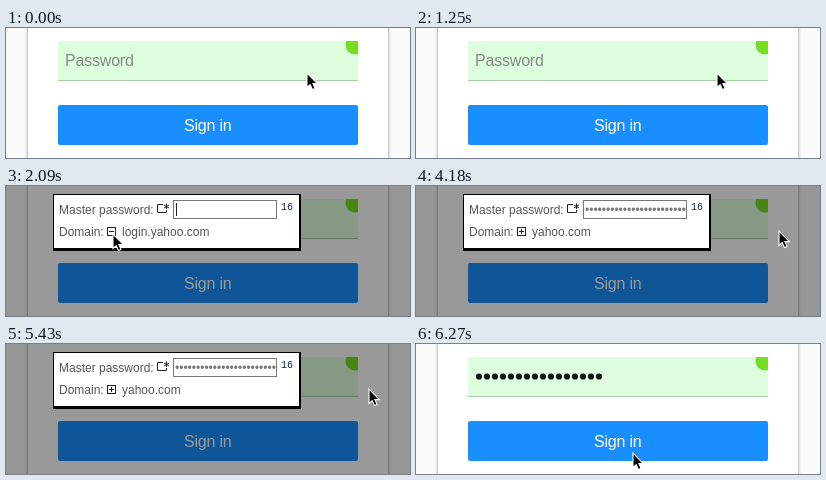
Animation, 404 px wide and 130 px high, one loop 8.36 s. Source, as an HTML page:

```html
<!DOCTYPE html>
<html lang="en">
<head>
<meta charset="utf-8">
<title>Sign in</title>
<style>
  html, body { margin: 0; width: 100%; height: 100%; overflow: hidden; background: #fafafa; }
  svg { position: absolute; left: 0; top: 0; width: 404px; height: 130px; display: block; }
  text { font-family: "Liberation Sans", Arial, sans-serif; font-size: 12px; fill: #555; white-space: pre; }
  .big { font-size: 16px; letter-spacing: -.2px; }
  .mono { font-family: "Liberation Mono", "DejaVu Sans Mono", monospace; font-size: 10px; fill: #124; }
  .line { fill: none; stroke: #222; }

  .empty, .popup, .open, .typed, .filled { animation: 8360ms step-end infinite; }
  .empty { animation-name: empty; }
  .popup { animation-name: popup; }
  .open { animation-name: open; }
  .typed { animation-name: typed; }
  .filled { animation-name: filled; }
  .cursor { animation: move 8360ms step-end infinite; }

  @keyframes empty { 0% { visibility: visible } 75%, 100% { visibility: hidden } }
  @keyframes popup { 0% { visibility: hidden } 25% { visibility: visible } 75%, 100% { visibility: hidden } }
  @keyframes open { 0% { visibility: hidden } 25% { visibility: visible } 50%, 100% { visibility: hidden } }
  @keyframes typed { 0% { visibility: hidden } 50% { visibility: visible } 75%, 100% { visibility: hidden } }
  @keyframes filled { 0% { visibility: hidden } 75%, 100% { visibility: visible } }
  @keyframes move {
    0% { transform: translate(301px, 45px) }
    25% { transform: translate(107px, 48px) }
    50% { transform: translate(363px, 45px) }
    75%, 100% { transform: translate(217px, 109px) }
  }
</style>
</head>
<body>
<svg viewBox="0 0 404 130">
  <defs>
    <clipPath id="field"><rect x="52" y="13" width="300" height="40"/></clipPath>
    <clipPath id="input"><rect x="168" y="15" width="102" height="17"/></clipPath>
    <filter id="soft" x="-10%" y="-10%" width="120%" height="120%"><feGaussianBlur stdDeviation="1.5"/></filter>
  </defs>

  <!-- form -->
  <rect x="21.5" y="-20" width="361" height="170" fill="#000" opacity=".35" filter="url(#soft)"/>
  <rect x="22" y="-20" width="360" height="170" fill="#fff"/>
  <g clip-path="url(#field)">
    <rect x="52" y="13" width="300" height="40" fill="#dfd"/>
    <rect x="52" y="52" width="300" height="1" fill="#a9cda9"/>
    <circle cx="349" cy="17" r="9.5" fill="#7d2"/>
  </g>
  <text class="big empty" x="59" y="38" style="fill:#888">Password</text>
  <path class="filled" d="M63 32.5H184" fill="none" stroke="#111" stroke-width="6.2" stroke-linecap="round" stroke-dasharray="0 8"/>
  <rect x="52" y="77" width="300" height="40" rx="2" fill="#198fff"/>
  <text class="big" x="178" y="103" style="fill:#fff">Sign in</text>

  <!-- master password popup -->
  <g class="popup">
    <rect width="404" height="130" opacity=".4"/>
    <rect x="47" y="8" width="248" height="57"/>
    <rect x="48" y="9" width="245" height="53" fill="#fff"/>
    <text x="53" y="28">Master password:</text>
    <path class="line" d="M157 18.5H151.5V26.5H160.5V24M160.5 17.5V23M158 19L163 22M158 22L163 19"/>
    <rect x="167.5" y="14.5" width="103" height="18" fill="#fff" stroke="#777"/>
    <text class="mono" x="275" y="24">16</text>
    <text x="53" y="50">Domain:</text>
    <rect class="line" x="101.5" y="41.5" width="8" height="8"/>
    <path class="line" d="M103 45.5H108"/>
  </g>
  <g class="open">
    <path d="M170.5 17V30" stroke="#222"/>
    <text x="116" y="50">login.yahoo.com</text>
  </g>
  <g class="typed">
    <path class="line" d="M105.5 43V48"/>
    <text x="116" y="50">yahoo.com</text>
    <text x="169" y="28" clip-path="url(#input)" style="fill:#777">••••••••••••••••••••••••</text>
  </g>

  <g class="cursor">
    <path d="M0 0V14.5L3.2 11.6L5.4 16.5L8 15.4L5.9 10.6H10.4Z" fill="#000" stroke="#fff" stroke-width="1.1"/>
  </g>
</svg>
</body>
</html>
```
